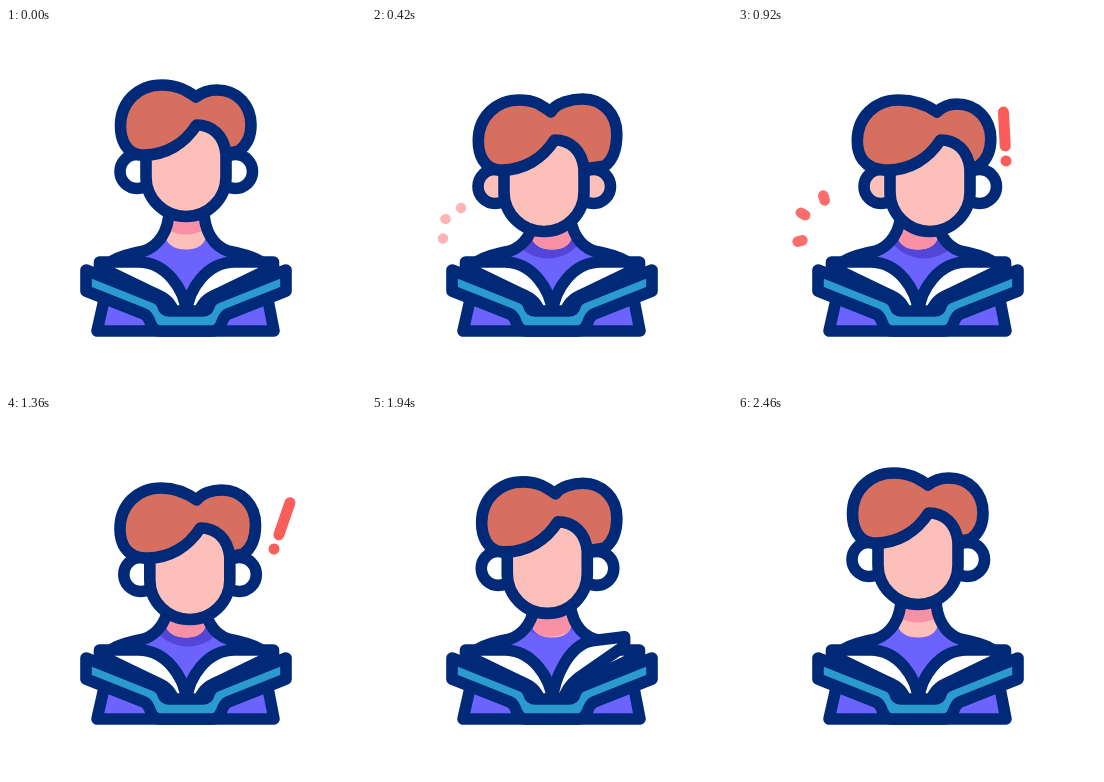
Animation of 360x360 px, one loop 2920 ms. Source, as an HTML page with a canvas:

```html
<!DOCTYPE html>
<html lang="en">
<head>
<meta charset="utf-8">
<title>Reader</title>
<style>
html, body { margin: 0; width: 100%; height: 100%; overflow: hidden; background: #fff; }
canvas { display: block; width: 100vmin; height: 100vmin; }
</style>
</head>
<body>
<canvas id="stage" width="360" height="360"></canvas>
<script>
const ctx = document.getElementById('stage').getContext('2d');
const LOOP = 2920;
const NAVY = '#002a78', SKIN = '#fdbfb9', HAIR = '#d66f60', SHIRT = '#6c63ff';
const SHIRT_DARK = '#5346d6', NECK_DARK = '#f990a6', COVER = '#2b9acd', RED = '#fb5e5a';

const clamp = v => Math.max(0, Math.min(1, v));
const ramp = (t, a, b) => clamp((t - a) / (b - a));
const ease = (t, a, b) => (1 - Math.cos(Math.PI * ramp(t, a, b))) / 2;

function paint(path, fill, line = NAVY, width = 11.6) {
  if (fill) { ctx.fillStyle = fill; ctx.fill(path); }
  if (line) { ctx.strokeStyle = line; ctx.lineWidth = width; ctx.stroke(path); }
}

const shirt = new Path2D('M163 182C163 204 152 218 138 223C127 225 117 227 106 233L94 236L98 270L91 303H269L262 270L266 236L254 233C243 227 233 225 222 223C208 218 197 204 197 182Z');
const neckline = new Path2D('M159 182H201V205Q199 221.5 180 221.5Q161 221.5 158 205Z');
const shoulders = new Path2D('M163 182C163 204 152 218 138 223C127 225 117 227 106 233M198 182C198 204 208 218 222 223C233 225 243 227 254 233');
const sides = new Path2D('M98 272L91 303H268L262 272');
const cover = new Path2D('M80 242L150 270Q155 272 157 278Q158 283 164 283H196Q202 283 203 278Q205 272 210 270L280 242V263L222 286Q218 288 216 294Q213 303 206 303H154Q147 303 144 294Q142 288 138 286L80 263Z');

// side runs from 1 (right page) through 0 (upright) to -1 (left page)
function page(side) {
  const lift = 42 * (1 - side * side);
  const x = v => 180.5 + v * side;
  const p = new Path2D();
  p.moveTo(x(0), 284);
  p.bezierCurveTo(x(2), 262, x(20), 234 - lift * 0.4, x(48), 234 - lift * 0.7);
  p.lineTo(x(87), 234 - lift);
  p.lineTo(x(87), 239 - lift * 0.7);
  p.lineTo(x(31), 266 - lift * 0.3);
  p.quadraticCurveTo(x(16), 272, x(13), 284);
  p.closePath();
  paint(p, '#fff');
}

function facePath(dx, dy) {
  const p = new Path2D();
  p.moveTo(140 + dx, 122 + dy);
  p.lineTo(140 + dx, 149 + dy);
  p.ellipse(180 + dx, 149 + dy, 40, 39.5, 0, Math.PI, 0, true);
  p.lineTo(220 + dx, 122 + dy);
  return p;
}

function drawBody(turn, nod) {
  paint(shirt, SHIRT, null);
  const shade = facePath(turn * 0.5, 18 + 24 * nod);
  ctx.save();
  ctx.clip(shirt);
  ctx.globalAlpha = nod;
  paint(shade, SHIRT_DARK, null);
  ctx.restore();
  paint(neckline, SKIN, null);
  ctx.save();
  ctx.clip(neckline);
  paint(shade, NECK_DARK, null);
  ctx.restore();
  paint(shoulders);
  paint(sides);
}

function drawEar(x, y, pink) {
  const p = new Path2D();
  p.arc(x, y, 17, 0, 2 * Math.PI);
  paint(p, '#fff', null);
  ctx.globalAlpha = pink;
  paint(p, SKIN, null);
  ctx.globalAlpha = 1;
  paint(p, null);
}

function drawHair(turn, nod) {
  const dy = 15 * nod;
  const left = 0.65 * turn - 3 * nod;
  const notch = turn - 3 * nod;
  const right = 0.4 * turn + 3 * nod;
  const top = 11 * nod + 0.25 * turn;
  const p = new Path2D();
  p.moveTo(135 + turn, 127 + dy);
  p.bezierCurveTo(120 + left, 126 + dy, 114.5 + left, 111 + dy, 114.5 + left, 98 + dy);
  p.bezierCurveTo(114.5 + left, 74 + dy, 132 + left, 57 + dy, 156 + left, 57 + dy);
  p.bezierCurveTo(171 + left, 57 + dy, 180 + notch, 62 + dy, 190 + notch, 69 + dy);
  p.bezierCurveTo(195 + notch, 65 + top, 202 + right, 62 + top, 211 + right, 62 + top);
  p.bezierCurveTo(231 + right, 62 + top, 245 + right, 77 + top, 245 + right, 97 + top);
  p.bezierCurveTo(245 + right, 108 + dy, 241 + right, 117 + dy, 233 + right, 123 + dy);
  p.lineTo(220 + turn, 126 + dy);
  p.bezierCurveTo(218 + turn, 107 + dy, 206 + turn, 97 + dy, 190.5 + turn, 97 + dy);
  p.bezierCurveTo(179 + turn, 115 + dy, 160 + turn, 128 + dy, 135 + turn, 127 + dy);
  p.closePath();
  paint(p, HAIR);
}

function drawHead(turn, nod) {
  const dy = 15 * nod;
  drawEar(131 + turn, 143.5 + dy, ramp(Math.abs(turn), 5, 7));
  drawEar(229.5 + turn, 143.5 + dy, ramp(-turn, 5, 7));
  paint(facePath(turn, dy), SKIN);
  ctx.fillRect(146 + turn, 97 + dy, 70, 30);
  drawHair(turn, nod);
}

function drawMark(t) {
  const scale = ramp(t, 460, 540) * (1 - ramp(t, 1700, 1800));
  if (!scale) return;
  const tilt = 60 - 63 * ease(t, 540, 920) + 22 * ease(t, 920, 1240);
  ctx.save();
  ctx.translate(268, 133);
  ctx.rotate(tilt * Math.PI / 180);
  ctx.scale(scale, scale);
  paint(new Path2D('M0 -49V-15M0 0V0.01'), null, RED, 11);
  ctx.restore();
}

function drawSparks(t) {
  const alpha = 0.45 * ramp(t, 300, 420) + 0.55 * ramp(t, 420, 640) - ramp(t, 900, 1120);
  if (alpha <= 0) return;
  const travel = (t - 420) / 500;
  const stretch = 2.5 * clamp(travel);
  ctx.globalAlpha = alpha;
  for (const [x, y, vx, vy] of [[89, 180, -3, -10], [73.5, 191, -8.5, -5], [71, 210.5, -9, 2.5]]) {
    const size = Math.hypot(vx, vy), k = Math.min(travel, 1);
    const cx = x + vx * k, cy = y + vy * k;
    const ox = vx / size * (stretch + 0.01), oy = vy / size * (stretch + 0.01);
    const p = new Path2D();
    p.moveTo(cx - ox, cy - oy);
    p.lineTo(cx + ox, cy + oy);
    paint(p, null, RED, 10.5);
  }
  ctx.globalAlpha = 1;
}

function draw(t) {
  const nod = ease(t, 10, 380) - ease(t, 1720, 2220);
  const turn = -8 * ease(t, 10, 400) + 20 * ease(t, 440, 920)
    - 20 * ease(t, 1140, 1640) + 8 * ease(t, 1720, 2220);
  ctx.lineCap = ctx.lineJoin = 'round';
  ctx.fillStyle = '#fff';
  ctx.fillRect(0, 0, 360, 360);
  drawBody(turn, nod);
  drawHead(turn, nod);
  page(-1);
  page(1);
  if (t > 1820 && t < 2460) page(Math.cos(Math.PI * ramp(t, 1820, 2460)));
  paint(cover, COVER);
  drawSparks(t);
  drawMark(t);
}

const start = performance.now();
function tick() {
  draw((performance.now() - start) % LOOP);
  requestAnimationFrame(tick);
}
tick();
</script>
</body>
</html>
```
